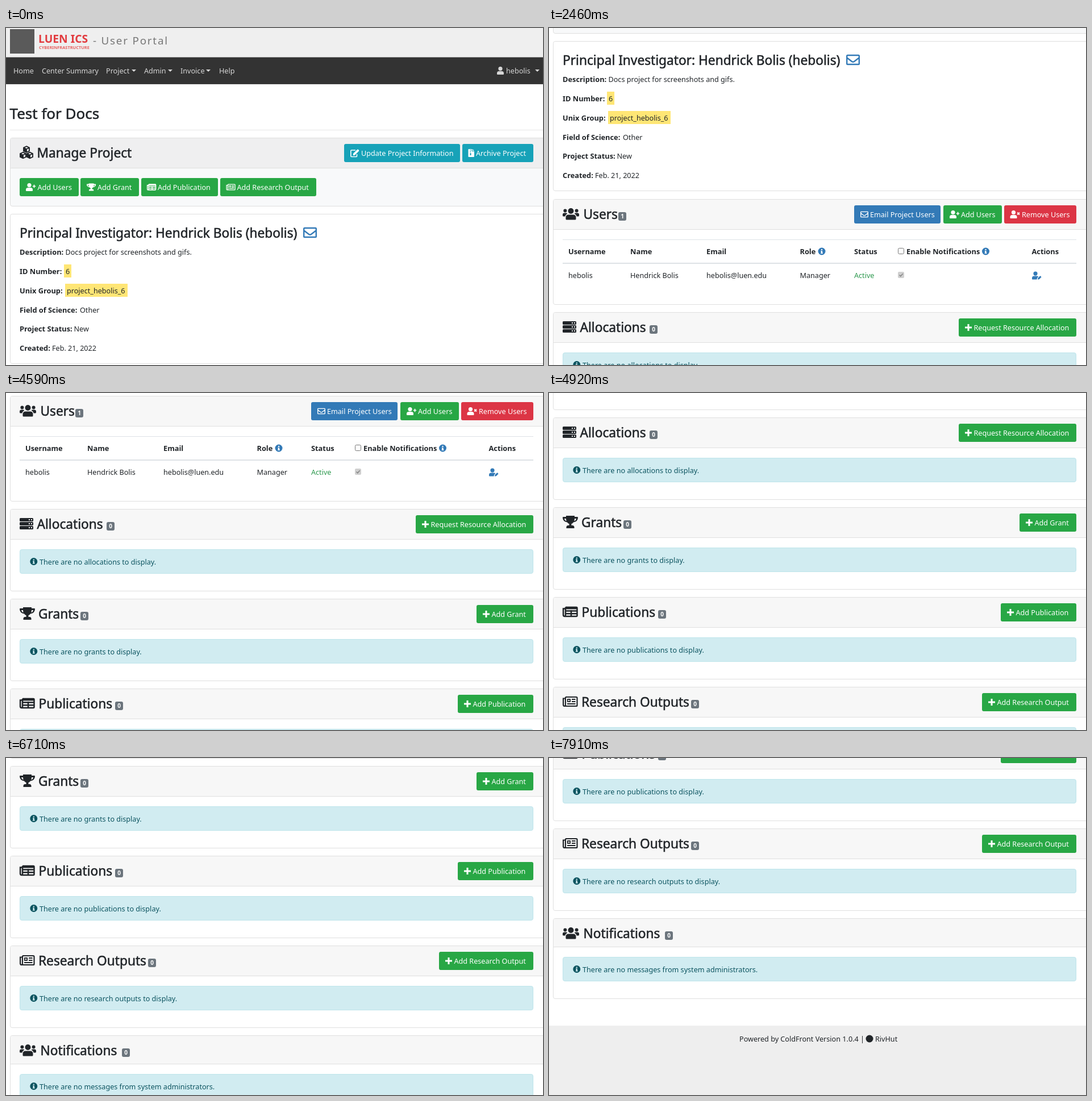
These frames come from a looping animation (945 by 593 pixels, 9.44 s). An HTML page:

```html
<!DOCTYPE html>
<html lang="en">
<head>
<meta charset="utf-8">
<title>User Portal</title>
<style>
  html, body { margin: 0; width: 100%; height: 100%; overflow: hidden; background: #fff; }
  svg { display: block; width: 945px; height: 593px; }
  text { font: 12.62px "Noto Sans", "Open Sans", sans-serif; fill: #212529; white-space: pre; }
  .b { font-weight: 700; font-size: 12.8px; }
  .h2, .h3 { stroke: #212529; stroke-width: .55px; }
  .h2 { font-size: 26px; }
  .h3 { font-size: 22.7px; }
  .badge { font-size: 10px; font-weight: 700; text-anchor: middle; }
  .brand { font-size: 19.3px; font-weight: 700; }
  .sub { font-size: 7.42px; font-weight: 700; }
  .portal { font-size: 18.8px; letter-spacing: 1.8px; }
</style>
</head>
<body>
<svg viewBox="0 0 945 593"><g id="page"></g></svg>
<script>
const INK = '#212529', GREEN = '#28a745', BLUE = '#337ab7', TEAL = '#17a2b8', RED = '#dc3545',
  GREY = '#6c757d', LINE = '#dfdfdf', NAV = '#d6d6d6';

// Icons: [filled path, stroked path, stroke width]; the origin is the left edge, vertically centred.
const person = 'M6-7a3.6 3.6 0 1 1 0 7.2a3.6 3.6 0 1 1 0-7.2M0 6V4.5Q0 1 3.5 1h5Q12 1 12 4.5V6q0 1-1 1H1Q0 7 0 6z';
const sheet = 'M5-8h19q1.5 0 1.5 1.5v13q0 1.5-1.5 1.5h-20.5q-2.4 0-2.4-2.4V-5.5H5M5-8V5.5Q5 8 3.5 8';
const cubes = [[12, -5.5], [6, 5], [18, 5]];
const icons = {
  cubes: [cubes.map(([x, y]) => `M${x - 5} ${y - 2.9}l5 2.4v5.8l-5-2.4z`).join(''),
    cubes.map(([x, y]) => `M${x} ${y - 5.3}l5 2.4v5.8l-5 2.4-5-2.4v-5.8zm-5 2.4l5 2.4 5-2.4m-5 2.4v5.8`).join(''), 1.9],
  users: ['M14.5-10a5 5 0 1 1 0 10a5 5 0 1 1 0-10M5.5 9V6.5q0-5 5-5h8q5 0 5 5V9q0 1.5-1.5 1.5H7Q5.5 10.5 5.5 9z' +
    'M4.4-8.5a3 3 0 1 1 0 6a3 3 0 1 1 0-6m20.2 0a3 3 0 1 1 0 6a3 3 0 1 1 0-6' +
    'M0 3V1.5q0-3 3-3h3q1.5 0 2.3 1Q5 1.5 4.4 4.5H1.5Q0 4.5 0 3z' +
    'M29 3V1.5q0-3-3-3h-3q-1.5 0-2.3 1Q24 1.5 24.6 4.5h2.9Q29 4.5 29 3z'],
  server: [[-10, -3, 4].map(y => `M1.5 ${y}h21q1.5 0 1.5 1.5v3q0 1.5-1.5 1.5h-21q-1.5 0-1.5-1.5v-3` +
    `q0-1.5 1.5-1.5zM16 ${y + 2}h2v2h-2zm4 0h2v2h-2z`).join('')],
  trophy: ['M6-11h15v2h5q1 0 1 1q0 7-8 8.5q-1.5 2-3.5 2.8V6h2q3 0 3 3.5v1.5H6.5V9.5Q6.5 6 9.5 6h2V3.3Q9.5 2.5 8 .5' +
    'Q0-1 0-8q0-1 1-1h5zM3-6q.5 3.5 3.6 4.2Q6-4 6-6zM24-6h-3q0 2-.6 4.2Q23.5-2.5 24-6z'],
  paper: ['M5-8h20v3.5H5z', sheet + 'M5-1.5h20M5 3.2h20M15-3V8', 2.5],
  news: ['M8-5h6v6H8zM9.8-3.2v2.4h2.4v-2.4z', sheet + 'M16-4h6.5M16 0h6.5M8 4h14.5', 2.2],
  mail: ['', 'M2.5-8h19q1.3 0 1.3 1.3V6.7q0 1.3-1.3 1.3h-19Q1.2 8 1.2 6.7V-6.7Q1.2-8 2.5-8z' +
    'M1.5-3.5L10 3q2 1.3 4 0l8.5-6.5', 2.4],
  user: [person],
  userAdd: [person, 'M14.5-4.2v5.4M11.8-1.5h5.4', 1.7],
  userCut: [person, 'M12.7-3.3l3.8 3.8m0-3.8l-3.8 3.8', 1.8],
  userEdit: ['M6-7a3.6 3.6 0 1 1 0 7.2a3.6 3.6 0 1 1 0-7.2M0 6V4.5Q0 1 3.5 1h5q2 0 2.8 1L9 4.4 8.6 7H1Q0 7 0 6z' +
    'M10 7l.4-2.5 4-4 2.2 2.2-4 4z'],
  plus: ['', 'M0 0h12M6-6V6', 3],
  edit: ['M5 1l7-7q1-1 2 0l.8.8q1 1 0 2l-7 7-3 .4z',
    'M9-5H2Q.8-5 .8-4V5.5Q.8 6.5 2 6.5h8.5q1 0 1-1V2', 1.6],
  archive: ['M0-6q0-1 1-1h5v4h4.5v9q0 1-1 1H1Q0 7 0 6zM7-7l3.5 3H7zM3-6h1.5v1.5H3zM3-3h1.5v1.5H3zM3 0h2v4H3z'],
  info: ['M6.5-6.5a6.5 6.5 0 1 1 0 13a6.5 6.5 0 1 1 0-13M5.4-4h2.2v2H5.4zM4.8-1h2.8v3.6h.8V4H4.6V2.6h.8V.4h-.6z'],
  caret: ['M0-2h8L4 2z'],
};

let out = '';
const rect = (x, y, w, h, fill, extra = '') =>
  out += `<rect x="${x}" y="${y}" width="${w}" height="${h}" fill="${fill}" ${extra}/>`;
const text = (x, y, s, cls = '', fill = '') =>
  out += `<text x="${x}" y="${y}" class="${cls}" ${fill && `style="fill:${fill}"`}>${s}</text>`;
const icon = (name, x, y, color = INK, scale = 1) => {
  const [solid, line = '', width = 0] = icons[name];
  out += `<g transform="translate(${x} ${y}) scale(${scale})"><path d="${solid}" fill="${color}" fill-rule="evenodd"/>` +
    `<path d="${line}" fill="none" stroke="${color}" stroke-width="${width}"/></g>`;
};

function button(x, y, w, color, name, iconX, textX, label, scale = 1) {
  rect(x, y, w, 32, color, 'rx="3"');
  icon(name, iconX, y + 16, '#fff', scale);
  text(textX, y + 20.5, label, '', '#fff');
}

function card(y, h, head = 0, headFill = '#f7f7f7', bodyFill = '#fff') {
  rect(7.5, y, 960, h, bodyFill, `rx="3.4" stroke="${LINE}"`);
  if (!head) return;
  rect(8, y + .5, 940, head - .5, headFill, 'rx="3"');
  rect(8, y + head - .5, 940, 1, LINE);
}

function heading(y, name, x, label, badgeX, count) {
  icon(name, 24, y + 25.5);
  text(x, y + 34, label, 'h3');
  rect(badgeX, y + 22.5, 14, 15, GREY, 'rx="3"');
  text(badgeX + 7, y + 33.7, count, 'badge', '#fff');
}

function emptySection(y, name, x, label, badgeX, what, addX, addLabel) {
  const short = addLabel ? 0 : 3;
  card(y, 144 - short, 53 - short);
  heading(y, name, x, label, badgeX, 0);
  if (addLabel) button(addX, y + 10.5, 928 - addX, GREEN, 'plus', addX + 11, addX + 26.5, addLabel);
  const top = y + 71 - short;
  rect(24.5, top, 903, 42, '#d1ecf1', 'rx="3.4" stroke="#bee5eb"');
  icon('info', 42.3, top + 21, '#0c5460');
  text(59, top + 26, `There are no ${what}.`, '', '#0c5460');
}

// Header and navigation
rect(0, 0, 945, 52, '#efefef');
rect(7, 2, 43, 43, '#5a5a5a');
text(57, 26, 'LUEN ICS', 'brand', '#e23b3f');
text(58, 36.7, 'CYBERINFRASTRUCTURE', 'sub', '#e8605f');
text(153, 28.5, '- User Portal', 'portal', '#777');
rect(0, 51.5, 945, 47.4, '#333');
[[13, 'Home'], [63, 'Center Summary'], [176, 'Project'], [243, 'Admin'], [307, 'Invoice'], [375, 'Help'], [880, 'hebolis']]
  .forEach(([x, s]) => text(x, 80, s, '', NAV));
[221, 285, 352, 931].forEach(x => icon('caret', x, 75, NAV));
icon('user', 864, 75, NAV);

text(6.5, 159.5, 'Test for Docs', 'h2');
rect(7, 179, 938, 1, '#e6e6e6');

// Manage card
card(193.5, 120, 53, '#efeff0', '#f8f9fa');
icon('cubes', 24, 219);
text(54.5, 227.5, 'Manage Project', 'h3');
button(595, 204, 204, TEAL, 'edit', 606, 625, 'Update Project Information');
button(803, 204, 125, TEAL, 'archive', 813.5, 827, 'Archive Project');
button(24, 264, 104, GREEN, 'userAdd', 35, 55.5, 'Add Users');
button(131, 264, 103, GREEN, 'trophy', 142, 161, 'Add Grant', .6);
button(238, 264, 135, GREEN, 'paper', 248, 267, 'Add Publication', .61);
button(377, 264, 169, GREEN, 'news', 387.5, 406.5, 'Add Research Output', .61);

// Project details
card(327.5, 263);
text(24, 368.5, 'Principal Investigator: Hendrick Bolis (hebolis)', 'h3');
icon('mail', 523, 360, BLUE);
rect(102, 416, 13, 23, '#ffe675');
rect(104, 450, 110, 23, '#ffe675');
[['Description:', 104.5, 'Docs project for screenshots and gifs.'], ['ID Number:', 105, '6'],
 ['Unix Group:', 107, 'project_hebolis_6'], ['Field of Science:', 130, 'Other'],
 ['Project Status:', 119.5, 'New'], ['Created:', 81, 'Feb. 21, 2022']].forEach(([label, x, value], i) => {
  const y = 399 + i * 33.85;
  text(24, y, label, 'b');
  text(x, y, value);
});

// Users
card(605.5, 185, 53);
heading(605.5, 'users', 60.5, 'Users', 122, 1);
button(537, 616, 152, BLUE, 'mail', 548, 565, 'Email Project Users', .58);
button(694, 616, 103, GREEN, 'userAdd', 705, 725, 'Add Users');
button(801, 616, 127, RED, 'userCut', 811.5, 832, 'Remove Users');
rect(24, 676, 904, 1, '#dee2e6');
rect(24, 717, 904, 2, '#dee2e6');
[[34, 'Username', 'hebolis'], [143, 'Name', 'Hendrick Bolis'], [277, 'Email', 'hebolis@luen.edu'], [441.5, 'Role', 'Manager'],
 [537, 'Status', 'Active'], [629, 'Enable Notifications', ''], [849.5, 'Actions', '']].forEach(([x, head, value]) => {
  text(x, 701.7, head, 'b');
  text(x, 744, value, '', head === 'Status' ? '#2f9a50' : '');
});
icon('info', 473.5, 697, BLUE);
icon('info', 762, 697, BLUE);
rect(614.5, 691.5, 10, 10, '#fff', 'rx="2" stroke="#767676"');
rect(614, 733, 11, 11, '#d0d0d0', 'rx="2"');
out += '<path d="M616.5 738.5l2.2 2.3 4-4.6" fill="none" stroke="#888" stroke-width="1.6"/>';
icon('userEdit', 850, 739.5, BLUE);

emptySection(804.5, 'server', 54.5, 'Allocations', 177, 'allocations to display', 721, 'Request Resource Allocation');
emptySection(962.5, 'trophy', 57, 'Grants', 131, 'grants to display', 828, 'Add Grant');
emptySection(1120.5, 'paper', 57.5, 'Publications', 192, 'publications to display', 795, 'Add Publication');
emptySection(1278.5, 'news', 57, 'Research Outputs', 250, 'research outputs to display', 762, 'Add Research Output');
emptySection(1436.5, 'users', 60.5, 'Notifications', 204, 'messages from system administrators');

// Footer
rect(0, 1625, 945, 122, '#eee');
text(335, 1653, 'Powered by ColdFront Version 1.0.4 |');
out += `<circle cx="564" cy="1648" r="6.5" fill="${INK}"/>`;
text(574, 1653, 'RivHut');

const page = document.getElementById('page');
page.innerHTML = out;

// Wheel scrolling: start time, then the position in wheel notches at each 1/15 s step.
const LOOP = 9440, NOTCH = 84.5;
const bursts = [
  [1860, [.21, .55, .9, 1.25, 1.6, 2, 2.4, 2.8, 3.2, 3.6, 3.9, 4]],
  [2990, [4.22, 4.66, 4.94, 5]],
  [3450, [5.25, 5.72, 6, 6, 6.25, 6.72, 7]],
  [4590, [7.1, 7.5, 7.95, 8.35, 8.8, 9]],
  [5650, [9.22, 9.66, 9.94, 10, 10.31, 10.8, 11]],
  [6710, [11.22, 11.66, 11.94, 12, 12, 12.12, 12.49, 12.87, 13]],
  [7710, [13.15, 13.43, 13.61, 13.657]],
];

function scrollAt(t) {
  let pos = 0;
  for (const [start, steps] of bursts)
    steps.forEach((p, k) => { if (t >= start + Math.round(k * 20 / 3) * 10) pos = p; });
  return Math.round(pos * NOTCH);
}

function draw() {
  page.setAttribute('transform', `translate(0 ${-scrollAt(performance.now() % LOOP)})`);
  requestAnimationFrame(draw);
}
draw();
</script>
</body>
</html>
```
